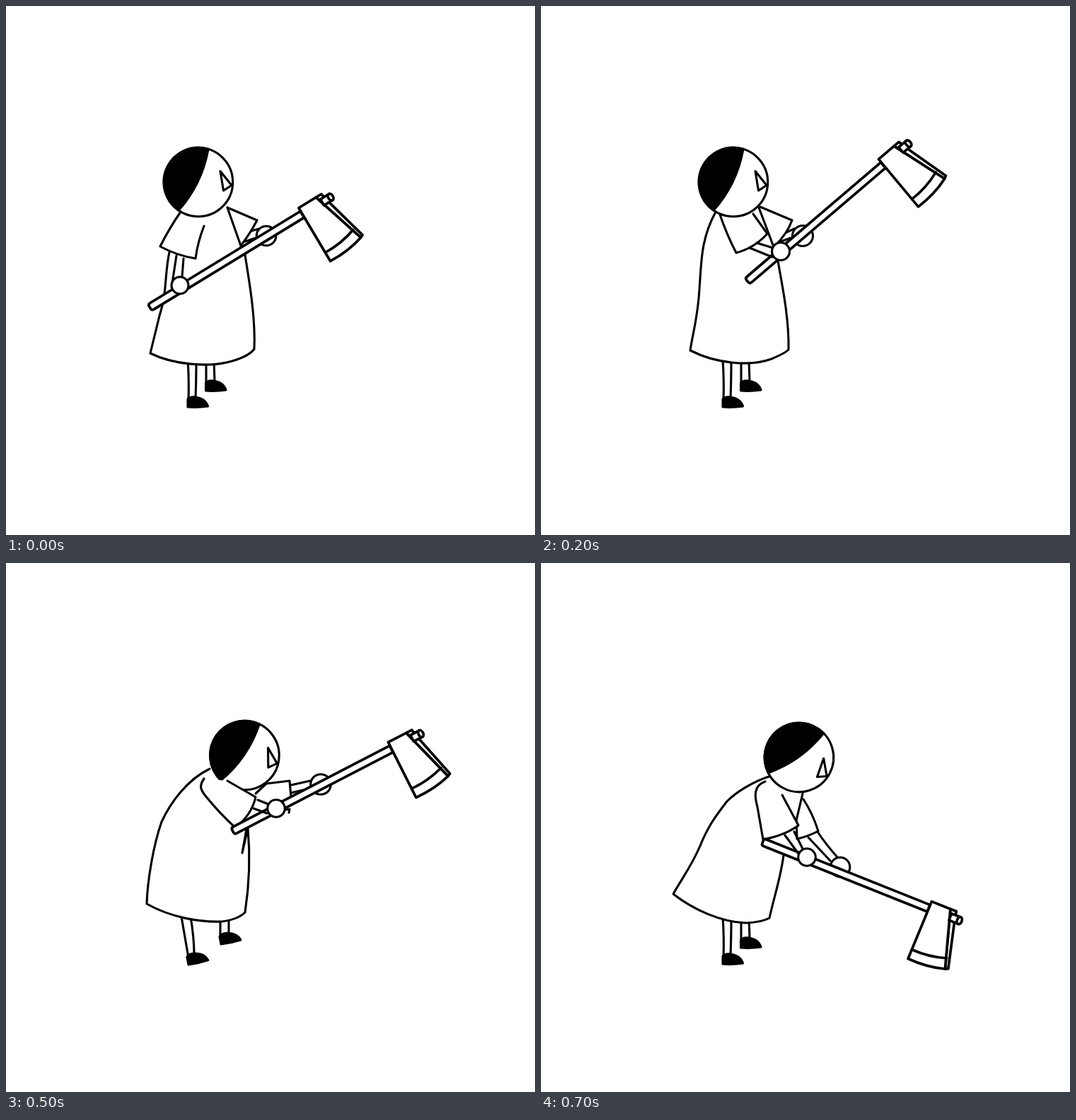
Write an HTML page that moves like this. It is 748 px wide and 748 px high and loops after 0.9 s.

```html
<!DOCTYPE html>
<html lang="en">
<head>
<meta charset="utf-8">
<title>Axe swing</title>
<style>
  html, body { margin: 0; width: 100%; height: 100%; overflow: hidden; background: #fff; }
  svg { display: block; width: 100%; height: 100%; }
  .pose { fill: #fff; stroke: #000; stroke-width: 3.1; stroke-linecap: round; stroke-linejoin: round; opacity: 0; }
  .axe { stroke-width: 3.7; }
  .ink { fill: #000; }
  .line { fill: none; }
</style>
</head>
<body>
<svg id="stage" viewBox="0 0 748 748"></svg>
<script>
const LOOP = 900;
const stage = document.getElementById('stage');

const path = (d, cls = '') => `<path class="${cls}" d="${d}"/>`;
const circle = (x, y, r) => `<circle cx="${x}" cy="${y}" r="${r}"/>`;
const place = (x, y, turn, body, cls = '') =>
  `<g class="${cls}" transform="translate(${x} ${y}) rotate(${turn})">${body}</g>`;

// Origin: middle of the face
const head = (x, y, turn) => place(x, y, turn,
  circle(0, 0, 48.7) +
  path('M14 -46.6A48.7 48.7 0 0 0 -28 40Q5 3 14 -46.6Z', 'ink') +
  path('M31 -15.5L47 4.5L35.5 12Z'));

// Origin: butt of the handle, which runs along +x
const axe = (x, y, turn) => place(x, y, turn,
  path('M251 -5.2H2Q-1.5 -5.2 -1.5 -2V2Q-1.5 5.2 2 5.2H251Z') +
  path('M280 -10.5H289L293 8L308.5 69L304.5 71Z') +
  path('M251.5 -10.5L280 -10.5L304.5 71Q280 78.5 250.5 77Z') +
  path('M251 63Q277 64 301 56', 'line') +
  path('M284 -5H298V5H284Z') +
  '<ellipse cx="298" cy="0" rx="3.4" ry="5.2"/>', 'axe');

// Origin: back of the heel
const shoe = (x, y, turn) => place(x, y, turn,
  path('M0 0V-11Q3 -15 11 -14Q25 -12 28.5 -1Q14 1 0 0Z', 'ink'));

const legs = {
  still: path('M257 500Q259 530 258 557M269 500Q269 530 268 554M283 500V536M294 500L295 532', 'line') +
    shoe(257, 567, 0) + shoe(282.5, 544, 0),
  back: path('M248 500L258 558M261 500Q266 530 266 554M294 500L304 534M306 500L312 526', 'line') +
    shoe(258, 568, -11) + shoe(307, 541, -20),
  lunge: path('M248 500L258 558M261 500Q266 530 266 554M303 500V532M315 500V525', 'line') +
    shoe(258, 568, -11) + shoe(304, 539, -10)
};

function pose(start, end, p) {
  const g = document.createElementNS('http://www.w3.org/2000/svg', 'g');
  const face = head(...p.head), sleeve = path(p.sleeve);
  g.setAttribute('class', 'pose');
  g.innerHTML = legs[p.legs || 'still'] +
    circle(...p.farHand) + path(p.farArm, 'line') + path(p.farSleeve) +
    path(p.gown) + (p.sleeveOnTop ? face + sleeve : sleeve + face) +
    axe(...p.axe) + path(p.arm, 'line') + circle(...p.hand);
  stage.append(g);
  const key = (ms, opacity) => ({ offset: ms / LOOP, opacity, easing: 'step-end' });
  g.animate([key(0, 0), key(start, 1), key(end, 0), key(LOOP, 0)],
    { duration: LOOP, iterations: Infinity });
}

// Ready, axe held low
pose(0, 100, {
  head: [272, 249, 0], axe: [204.7, 425.5, -31.4],
  gown: 'M247 291L231 348C224 380 228 405 217 438L204 491C238 508 286 510 312 504Q342 497 351 485C353 440 344 390 338 352L332 339L313 285',
  sleeve: 'M247 291Q231 314 218 340Q242 353 268 357Q271 334 280 311',
  farSleeve: 'M313 285L355 303Q345 322 332 339', farArm: 'M347 318L358 315M338 333L353 328',
  farHand: [368, 325, 13.8],
  arm: 'M241 353L235 392M251 357L249 383', hand: [246, 395, 12]
});

// Near hand slides up the handle
pose(100, 200, {
  head: [272, 249, 0], axe: [249, 407, -36],
  gown: 'M247 291C232 325 228 360 224 398C222 440 212 465 207 489C244 508 290 510 320 501Q343 492 351 485C352 440 342 390 336 354L331 339L311 285',
  sleeve: 'M249 292L246 349Q273 353 297 342L290 303',
  farSleeve: 'M312 285L355 303Q345 322 332 339', farArm: 'M347 318L358 315M338 333L353 328',
  farHand: [368, 325, 14],
  arm: 'M265 351L286 370M279 348L292 361', hand: [297, 372, 12.2]
});

// Both hands together
pose(200, 300, {
  head: [272, 249, 0], axe: [293, 388, -40.5],
  gown: 'M247 291C226 330 227 360 224 400C222 440 214 465 211 487C248 506 296 510 326 499Q345 491 350 486C351 440 340 390 334 355L328 338L308 285',
  sleeve: 'M252 292Q262 322 276 349Q302 342 320 322L300 294',
  farSleeve: 'M310 284L355 303Q348 322 331 339', farArm: 'M347 320L358 315M339 333L353 328',
  farHand: [370, 325, 14.5],
  arm: 'M305 335L328 342M295 342L327 355', hand: [339, 347, 12.5]
});

// Lifting
pose(300, 400, {
  head: [265, 249, 0], axe: [355, 365, -80],
  gown: 'M238 291C219 330 220 365 219 400C219 440 213 465 212 491C247 507 293 509 322 499Q343 491 350 482C350 435 338 385 327 352L318 326',
  sleeve: 'M246 303C250 328 258 341 270 344Q305 338 328 318L303 284',
  farSleeve: 'M305 280L346 284Q344 301 330 314', farArm: 'M345 285L361 272M343 296L361 284',
  farHand: [373, 263, 14],
  arm: 'M320 303L355 293M328 316L359 306', hand: [367, 296, 12.3]
});

// Axe behind the head
pose(400, 500, {
  legs: 'back', sleeveOnTop: true,
  head: [257, 249, 0], axe: [367, 322, -118.3],
  gown: 'M228 291C210 330 212 370 214 400C215 440 213 470 213 496C245 508 290 508 318 500Q340 492 351 477C347 425 333 385 322 355L305 326',
  sleeve: 'M243 326C248 336 254 338 262 338Q292 334 324 318Q316 292 299 272L261 299',
  farSleeve: 'M300 274L316 292', farArm: 'M307 247L317 260M302 273L317 262',
  farHand: [317, 226, 14.3],
  arm: 'M307 281L317 264M318 298L334 266', hand: [326, 256, 12.2]
});

// Swinging forward
pose(500, 600, {
  legs: 'lunge', sleeveOnTop: true,
  head: [337.5, 272, 8.5], axe: [322, 378.5, -27.4],
  gown: 'M288 291C255 307 232 340 220 366C208 400 200 450 199 482C235 502 275 508 305 507Q328 504 338 494C344 455 346 420 342 375L334 410L342 365',
  sleeve: 'M280 305C273 315 275 320 281 328Q302 354 324 374Q347 357 353 331L313 308',
  farSleeve: 'M353 326L368 312L401 308L403 331', farArm: 'M403 314L430 308M403 325L420 321',
  farHand: [445, 313, 14.3],
  arm: 'M356 335L371 341M350 347L369 354M394 349L401 348L400 353', hand: [382, 347, 12.3]
});

// Coming down
pose(600, 700, {
  head: [366, 291, 40.5], axe: [291, 407, 5.5],
  gown: 'M323 301C285 312 250 345 236 365C220 395 202 440 187 468C215 490 255 508 290 509Q312 508 323 502C330 475 338 450 341 418L353 397L368 344',
  sleeve: 'M302 313Q287 322 292 335Q301 366 313 392Q341 386 357 367L329 327',
  farSleeve: 'M383 341Q396 357 405 375Q386 389 366 393L359 378', farArm: 'M403 377L424 399M390 385L410 403',
  farHand: [422, 412, 13.3],
  arm: 'M339 386L359 405M331 389L353 416', hand: [367, 414, 12.3]
});

// Bottom of the stroke, held
pose(700, 900, {
  head: [365, 275, 28.6], axe: [315, 395, 21.8],
  gown: 'M325 301C297 310 275 325 263 337C245 360 235 375 225 400C212 430 198 448 187 468C215 490 255 508 290 509Q312 508 323 502C330 470 339 445 343 413M361 364L370 326',
  sleeve: 'M317 309C300 315 302 330 306 345L314 391Q345 385 364 371L341 328',
  farSleeve: 'M371 334Q384 354 392 379Q377 387 362 390L361 364', farArm: 'M391 380Q403 398 419 416M378 388L409 421',
  farHand: [423, 430, 13.8],
  arm: 'M358 380L370 404M345 385L364 411', hand: [376, 416, 12.3]
});
</script>
</body>
</html>
```
